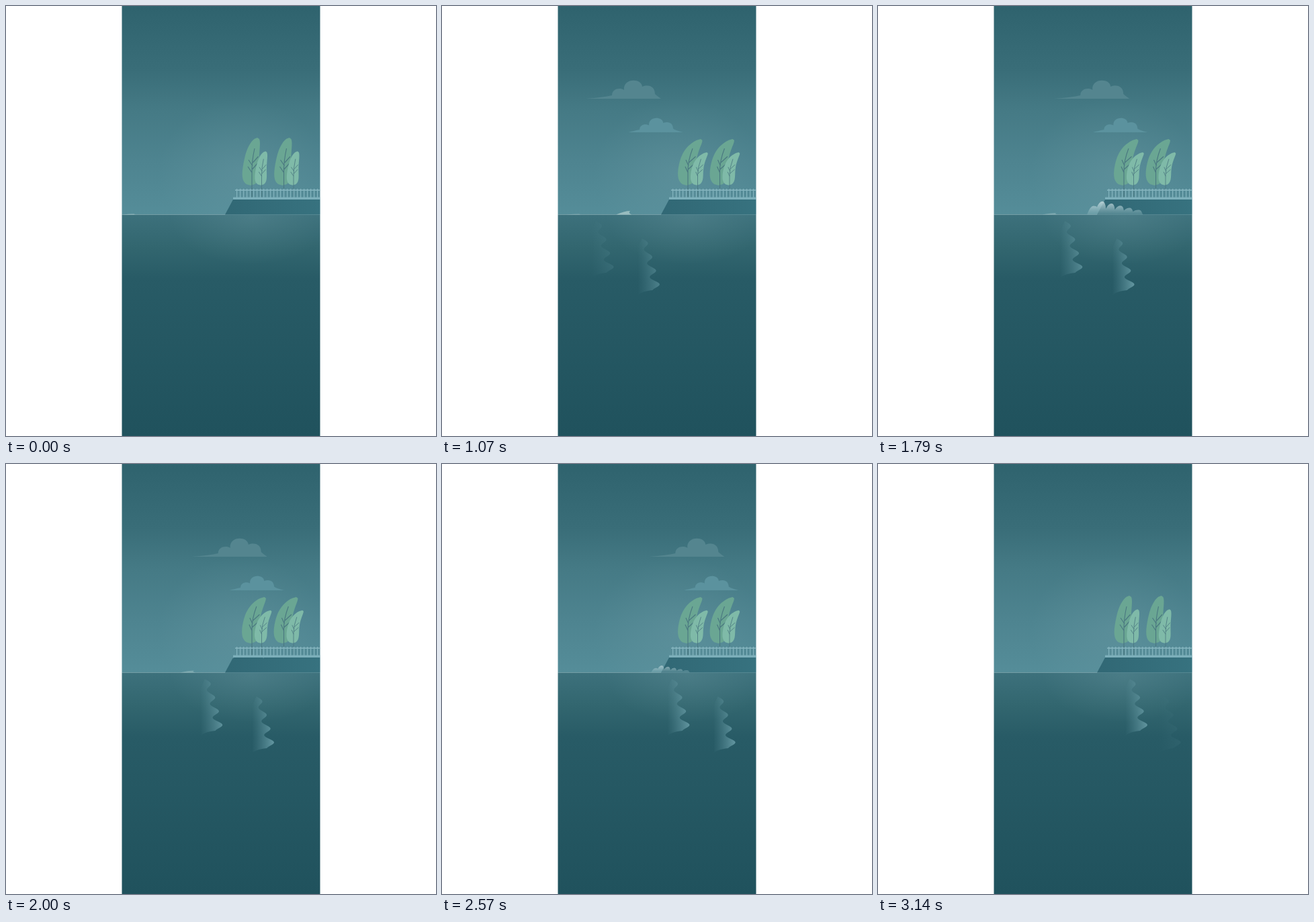
Animation, 640 px wide and 640 px high, one loop 3210 ms. Source, as an HTML page with a canvas:

```html
<!DOCTYPE html>
<html lang="en">
<head>
<meta charset="utf-8">
<title>Quay in the wind</title>
<style>
html, body { margin: 0; width: 100%; height: 100%; overflow: hidden; background: #fff; }
canvas { display: block; }
</style>
</head>
<body>
<canvas id="stage" width="640" height="640"></canvas>
<script>
const g = document.getElementById('stage').getContext('2d');
const LOOP = 3210, STEP = 1000 / 14, LEFT = 172.5, RIGHT = 467.5, SEA = 310.6;

// Smooth rise from 0 to 1 between two times.
function ramp(t, from, to) {
  const u = Math.min(1, Math.max(0, (t - from) / (to - from)));
  return u * u * (3 - 2 * u);
}

const pulse = (t, in0, in1, out0, out1) => ramp(t, in0, in1) * (1 - ramp(t, out0, out1));

function shade(gradient, ...stops) {
  stops.forEach(([at, color]) => gradient.addColorStop(at, color));
  return gradient;
}

function rect(x0, y0, x1, y1, fill) {
  g.fillStyle = fill;
  g.fillRect(x0, y0, x1 - x0, y1 - y0);
}

function fill(path, color) {
  g.fillStyle = color;
  g.fill(path);
}

// Draws in a moved, scaled frame with its own opacity.
function at(x, y, sx, sy, alpha, draw) {
  if (alpha <= 0) return;
  g.save();
  g.translate(x, y);
  g.scale(sx, sy);
  g.globalAlpha = alpha;
  draw();
  g.restore();
}

function clipped(x0, y0, x1, y1, draw) {
  g.save();
  g.beginPath();
  g.rect(x0, y0, x1 - x0, y1 - y0);
  g.clip();
  draw();
  g.restore();
}

const sky = shade(g.createLinearGradient(0, 0, 0, SEA),
  [0, '#2f636e'], [.3, '#396d78'], [.5, '#457a85'], [.75, '#4e8490'], [1, '#558d99']);
const water = shade(g.createLinearGradient(0, SEA, 0, 640),
  [0, '#3d717c'], [.15, '#32666f'], [.29, '#285b66'], [1, '#20525d']);
const glow = shade(g.createRadialGradient(0, 0, 0, 0, 0, 1),
  [0, 'rgba(122,165,173,.25)'], [1, 'rgba(122,165,173,0)']);
const wall = shade(g.createLinearGradient(326, 0, 468, 0), [0, '#316875'], [1, '#37727f']);
const foam = shade(g.createLinearGradient(0, -20, 0, 0),
  [0, 'rgba(212,228,230,.85)'], [.5, 'rgba(172,203,209,.65)'], [1, 'rgba(130,175,182,.4)']);
const sheen = shade(g.createLinearGradient(-32, 0, 0, 0),
  [0, 'rgba(105,157,168,0)'], [.2, 'rgba(105,157,168,.16)'], [1, 'rgba(120,172,182,.85)']);

// Column of light whose right edge swings wider towards the viewer.
const ripple = new Path2D();
ripple.moveTo(-32, -80);
for (let y = -94; y <= -17; y++) {
  const s = (y + 94) / 86;
  ripple.lineTo(-24 + 22 * s ** .8 + (4 + 3 * s) * Math.cos((y + 67) / 20.5 * 2 * Math.PI), y);
}
ripple.quadraticCurveTo(-28, -15, -32, -9);

// Row of curling crests, lower towards the right.
const splash = new Path2D('M0 0');
for (let i = 0; i < 6; i++) {
  const x = 10 + 13.5 * i, h = i ? 23 - 3.2 * i : 13;
  splash.quadraticCurveTo(x - 5, -h, x, -h);
  splash.quadraticCurveTo(x + 4, -h, x + 5, -h * (i ? .45 : .85));
}
splash.lineTo(84, 0);

function tree(x, scale, bend, color) {
  const height = 71 - 2 * bend;
  const center = s => -2 + 10 * s ** 3 + bend * 11 * s ** 4;
  const edge = (s, side) => {
    const half = 14.5 * (1 - .45 * s) * Math.sqrt(1 - (2 * s - 1) ** 4) * (1 + .2 * bend * s);
    g.lineTo(center(s) + side * half, -height * s + 1);
  };
  at(x, 266, scale, scale, 1, () => {
    g.beginPath();
    for (let i = 0; i <= 40; i++) edge(i / 40, -1);
    for (let i = 40; i >= 0; i--) edge(i / 40, 1);
    g.fillStyle = color;
    g.fill();

    g.beginPath();
    g.moveTo(0, 26);
    g.lineTo(0, -20);
    g.quadraticCurveTo(0, -36, 4 + 3 * bend, -54);
    for (let i = 0; i < 4; i++) {
      const y = -18 - 5 * i, side = i % 2 ? 8 : -6;
      g.moveTo(i * .5, y);
      g.lineTo(i * .5 + side + bend * 2, y - 9);
    }
    g.strokeStyle = '#4a7880';
    g.lineWidth = 1.15;
    g.stroke();
  });
}

function cloud(x, y, scale, left, right, color, alpha) {
  at(x, y, scale, scale, alpha, () =>
    fill(new Path2D(`M${left} 0Q-45 -2 -32 -5C-32 -15 -20 -17 -14 -13C-16 -31 12 -31 13 -18` +
      `C24 -22 32 -17 32 -7Q35 -4 ${right} 0Z`), color));
}

function reflection(x, y, alpha) {
  at(x, y, 1, 1, alpha, () => fill(ripple, sheen));
}

function wave(age, strength) {
  if (age < 0) return;
  const x = 184 + .1 * age - 1.65e-5 * age * age;
  const h = (1.2 + .0042 * age) * strength;
  at(x, SEA, 1, 1, .7 * strength * (1 - ramp(age, 1400, 1700)), () =>
    fill(new Path2D(`M-13 0Q-1 ${-h} 8 ${-h}Q4 ${-h / 2} 10 0Z`), '#b4d0cf'));

  const rise = pulse(age, 1480, 1790, 1860, 2230);
  const stretch = .35 + .65 * (age - 1480) / 310;
  at(311, SEA, stretch, rise, pulse(age, 1450, 1750, 1750, 1950), () => fill(splash, foam));

  const u = (age - 1800) / 430;
  if (u <= 0 || u >= 1) return;
  g.fillStyle = `rgba(150,190,198,${.5 * (1 - u)})`;
  for (let i = 0; i < 6; i++) {
    g.beginPath();
    g.arc(308 + 15 * i + 65 * u, 294 - (i % 3) * 2 - 22 * u * (1 - u), .9, 0, 7);
    g.fill();
  }
}

function backdrop() {
  rect(0, 0, 640, 640, '#fff');
  rect(LEFT, 0, RIGHT, SEA, sky);
  rect(LEFT, SEA, RIGHT, 640, water);
  clipped(LEFT, 0, RIGHT, SEA, () => at(352, 248, 125, 110, 1, () => rect(-1, -1, 1, 1, glow)));
  clipped(LEFT, SEA, RIGHT, 640, () => at(365, 315, 120, 70, .9, () => rect(-1, -1, 1, 1, glow)));
}

function quay() {
  fill(new Path2D('M338 288H467.5V310.6H326Z'), wall);
  rect(338, 284.5, RIGHT, 288, '#7cafba');
  rect(341, 273.4, RIGHT, 274.8, '#8bbac4');
  for (let x = 343; x < RIGHT; x += 5) rect(x, 272, x + 1.2, 285, '#84b5bf');
}

function draw(t) {
  backdrop();
  clipped(LEFT, 0, RIGHT, 640, () => {
    const drift = ramp(t, 150, 3100), haze = pulse(t, 70, 500, 2650, 3000);
    cloud(253 + 138 * drift, 138, 1, -71, 41, '#54858f', haze);
    cloud(291 + 121 * drift, 188, .78, -53, 51, '#5b929e', haze);

    const sway = .96 + .04 * Math.cos((t - 1070) / 720 * 2 * Math.PI);
    const bend = sway * pulse(t, 600, 1070, 2700, 3120);
    for (const x of [366, 413.5]) {
      tree(x, 1, bend, '#6aa693');
      tree(x + 14.5, .71, bend, '#7fbaa8');
    }
    quay();

    reflection(285 + 165 * drift, 440, .85 * pulse(t, 200, 1700, 2550, 3300));
    reflection(242 + 165 * ramp(t, 570, 3500), 414, .8 * ramp(t, 500, 2300));

    wave(t, 1);
    wave(t - 930, .55);
  });
}

function frame(now) {
  const t = now % LOOP;
  draw(Math.floor((t + 5) / STEP) * STEP);
  requestAnimationFrame(frame);
}
requestAnimationFrame(frame);
</script>
</body>
</html>
```
